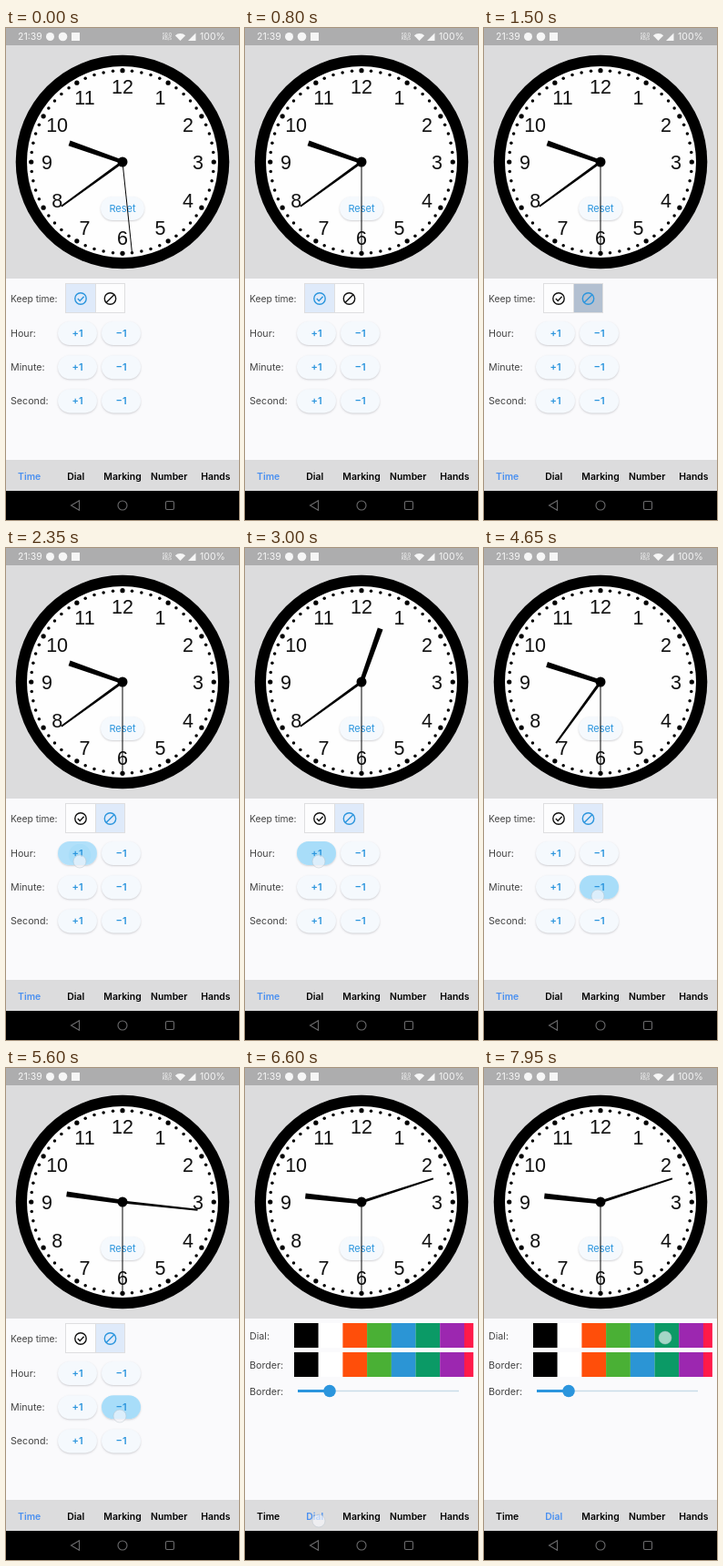
Animation, 256 px wide and 540 px high, one loop 8 s. Source, as an HTML page with a canvas:

```html
<!DOCTYPE html>
<html lang="en">
<head>
<meta charset="utf-8">
<title>Clock settings</title>
<style>
html, body { margin: 0; width: 100%; height: 100%; overflow: hidden; }
canvas { display: block; width: 256px; height: 540px; }
</style>
</head>
<body>
<canvas id="stage"></canvas>
<script>
const LOOP = 8000, W = 256, H = 540, TAU = Math.PI * 2;
const CX = 128, CY = 147;
const GREY = '#dcdcdd', PANEL = '#fafafc', FACE = '#fefefe', BLUE = '#2b95dd';
const PALE = '#f6f6f6', LABEL = '#444', BORDER = '#dedee0';
const SWATCHES = ['#000', '#fff', '#ff4e0a', '#4ab035', '#2b95d5', '#0b9a66', '#9c27b0', '#ff1a4a'];
const TABS = ['Time', 'Dial', 'Marking', 'Number', 'Hands'];
const SANS = 'Inter, sans-serif', DIGITS = '"Liberation Sans", Arial, sans-serif';

// Touches: place, press and release times
const HOUR_TOUCH = { x: 81, y: 344, from: 2100, to: 3420 };
const MINUTE_TOUCH = { x: 125, y: 382, from: 3850, to: 5780 };
const TOUCHES = [
  { x: 115, y: 302, from: 1080, to: 1350 }, HOUR_TOUCH, MINUTE_TOUCH,
  { x: 81, y: 497, from: 6300, to: 6620 }, { x: 199, y: 296, from: 7950, to: 8100 }
];
const KEEP_OFF = 1350, TAB_SWITCH = 6420;

const canvas = document.getElementById('stage'), c = canvas.getContext('2d');
const dpr = window.devicePixelRatio || 1;
canvas.width = W * dpr;
canvas.height = H * dpr;

const clamp = (v, lo = 0, hi = 1) => Math.min(hi, Math.max(lo, v));
const ramp = (t, from, length) => clamp((t - from) / length);
// Steps made by a held button: first after a delay, then at a steady rate
const repeats = (t, start, max) => clamp(Math.floor((t - start) / 47) + 1, 0, max);

function rect(x, y, w, h, fill) {
  c.fillStyle = fill;
  c.fillRect(x, y, w, h);
}

function disc(x, y, r, fill) {
  c.fillStyle = fill;
  c.beginPath();
  c.arc(x, y, r, 0, TAU);
  c.fill();
}

function ring(x, y, r, color, width) {
  c.strokeStyle = color;
  c.lineWidth = width;
  c.beginPath();
  c.arc(x, y, r, 0, TAU);
  c.stroke();
}

function path(points, closed) {
  c.beginPath();
  points.forEach(p => c.lineTo(...p));
  if (closed) c.closePath();
}

function line(points, color, width) {
  path(points);
  c.strokeStyle = color;
  c.lineWidth = width;
  c.stroke();
}

function text(str, x, y, color, size = 10.3, weight = 400, align = 'left', family = SANS) {
  c.font = `${weight} ${size}px ${family}`;
  c.textAlign = align;
  c.fillStyle = color;
  c.fillText(str, x, y + size * 0.36);
}

function pill(x, y, w, h) {
  c.beginPath();
  c.roundRect(x - w / 2, y - h / 2, w, h, h / 2);
}

function button(label, x, y, w, weight, touch, t) {
  c.save();
  c.shadowColor = 'rgba(80,80,90,.25)';
  c.shadowBlur = 2 * dpr;
  c.shadowOffsetY = dpr;
  c.fillStyle = '#f5f9fd';
  pill(x, y, w, 26);
  c.fill();
  c.restore();
  if (touch && t >= touch.from) {
    c.save();
    c.clip();
    c.globalAlpha = 1 - ramp(t, touch.to, 300);
    rect(x - w / 2, y - 13, w, 26, `rgba(170,222,250,${0.9 * ramp(t, touch.from, 250)})`);
    disc(touch.x, touch.y - 7, 34 * ramp(t, touch.from, 700), 'rgba(145,212,246,.3)');
    c.restore();
  }
  text(label, x, y, BLUE, 11, weight, 'center');
}

function hand(turn, length, base, tip) {
  c.save();
  c.translate(CX, CY);
  c.rotate(turn * TAU);
  path([[-base / 2, 0], [-tip / 2, -length], [tip / 2, -length], [base / 2, 0]], true);
  c.fillStyle = '#000';
  c.fill();
  c.restore();
}

function clock(t) {
  const second = t < 400 ? 29 : 30;
  const minute = 39 - repeats(t, 4530, 27);
  const hour = 9 + repeats(t, 2880, 12) + minute / 60;
  disc(CX, CY, 117.3, '#000');
  disc(CX, CY, 105, FACE);
  for (let i = 1; i <= 60; i++) {
    const a = i / 60 * TAU, sin = Math.sin(a), cos = Math.cos(a);
    disc(CX + 100.3 * sin, CY - 100.3 * cos, i % 5 ? 1.75 : 2.6, '#000');
    if (i % 5 === 0) text(i / 5, CX + 83 * sin, CY + 0.7 - 83 * cos, '#111', 21.5, 400, 'center', DIGITS);
  }
  button('Reset', 128, 198, 48, 400);
  hand(hour / 12, 62, 4.5, 6);
  hand(minute / 60, 83, 3, 2);
  hand(second / 60, 100, 1, 1);
  disc(CX, CY, 5.5, '#000');
}

function keepToggle(t) {
  const on = t < KEEP_OFF;
  rect(65, 280.5, 66, 32, '#fdfdfe');
  rect(on ? 65 : 98, 280.5, 33, 32, '#dfeafa');
  const press = ramp(t, 1100, 250) * (1 - ramp(t, 1500, 500));
  rect(98, 280.5, 33, 32, `rgba(150,165,182,${0.6 * press})`);
  c.strokeStyle = BORDER;
  c.lineWidth = 1;
  c.strokeRect(65.5, 280.5, 65, 32);
  line([[98.5, 281], [98.5, 312]], BORDER, 1);
  const left = on ? BLUE : '#111', right = on ? '#111' : BLUE;
  ring(82, 297, 6.2, left, 1.4);
  line([[78.8, 297], [81.2, 299.4], [85.6, 294.8]], left, 1.4);
  ring(114.5, 297, 6.2, right, 1.4);
  line([[118.8, 292.7], [110.2, 301.3]], right, 1.4);
}

function timePanel(t) {
  text('Keep time:', 5, 297, LABEL);
  keepToggle(t);
  ['Hour:', 'Minute:', 'Second:'].forEach((label, row) => {
    const y = 335 + row * 37.2;
    text(label, 5, y, LABEL, 10.7);
    button('+1', 78.5, y, 43, 600, row === 0 && HOUR_TOUCH, t);
    button('−1', 126.5, y, 43, 600, row === 1 && MINUTE_TOUCH, t);
  });
}

function dialPanel() {
  text('Dial:', 5, 294, LABEL, 10.7);
  text('Border:', 5, 326, LABEL, 10.7);
  text('Border:', 5, 355, LABEL, 10.7);
  for (const y of [280, 312])
    SWATCHES.forEach((color, i) => rect(54 + i * 26.7, y, i < 7 ? 26.8 : 10, 27, color));
  line([[58, 354.5], [235, 354.5]], '#c8dbe8', 1.6);
  line([[58, 354.5], [93, 354.5]], BLUE, 3);
  disc(93, 354.5, 6.8, BLUE);
}

function statusBar() {
  rect(0, 0, W, 19, '#adadae');
  text('21:39', 13, 9.5, PALE, 10.5);
  disc(48.5, 9.5, 4.5, PALE);
  disc(62.5, 9.5, 4.8, PALE);
  rect(72, 5, 9, 9, PALE);
  text('50.0', 177, 7.2, PALE, 4.6, 500, 'center');
  text('KB/S', 177, 11.8, PALE, 4.2, 500, 'center');
  c.beginPath();
  c.moveTo(191.5, 14);
  c.arc(191.5, 14, 8, -TAU * 0.375, -TAU * 0.125);
  c.fill();
  path([[200, 14], [208.5, 14], [208.5, 5.5]], true);
  c.fill();
  text('100%', 213, 9.5, PALE, 10.5);
}

function bottomBars(active) {
  rect(0, 474, W, 34, GREY);
  TABS.forEach((tab, i) =>
    text(tab, 25.6 + i * 51.2, 492, i === active ? '#4a90f0' : '#000', 10.4, 600, 'center'));
  rect(0, 508, W, 32, '#000');
  path([[71.5, 524], [80.5, 518.8], [80.5, 529.2]], true);
  c.strokeStyle = '#6a6a6c';
  c.lineWidth = 1.1;
  c.stroke();
  ring(128, 524, 5, '#6a6a6c', 1.1);
  c.beginPath();
  c.roundRect(175.5, 519.5, 9, 9, 1.5);
  c.stroke();
}

function touchDot({ x, y, from, to }, t) {
  if (t < from || t > to + 120) return;
  c.globalAlpha = 1 - ramp(t, to, 120);
  disc(x, y, 7, 'rgba(248,248,252,.65)');
  ring(x, y, 7, 'rgba(180,190,200,.45)', 1);
  c.globalAlpha = 1;
}

function draw(t) {
  c.setTransform(dpr, 0, 0, dpr, 0, 0);
  rect(0, 0, W, H, GREY);
  rect(0, 275, W, 199, PANEL);
  statusBar();
  clock(t);
  const dial = t >= TAB_SWITCH;
  if (dial) dialPanel();
  else timePanel(t);
  bottomBars(dial ? 1 : 0);
  TOUCHES.forEach(touch => touchDot(touch, t));
}

const start = performance.now();
function tick() {
  draw((performance.now() - start) % LOOP);
  requestAnimationFrame(tick);
}
tick();
</script>
</body>
</html>
```
